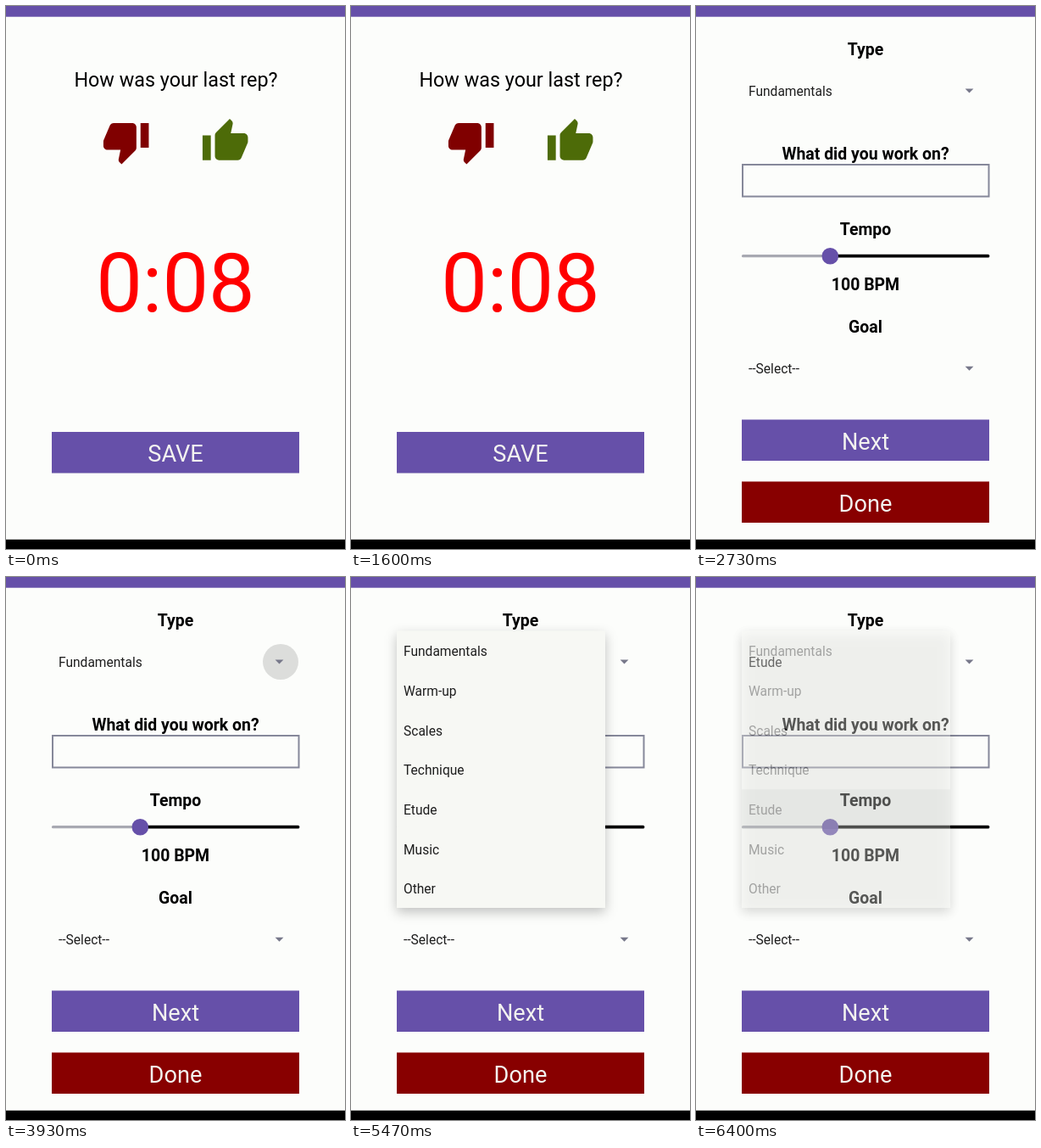
Recreate the animation shown at these times as an HTML page. Size 400 px wide and 640 px high, loop 6470 ms.

```html
<!DOCTYPE html>
<html lang="en">
<head>
<meta charset="utf-8">
<title>Practice log</title>
<style>
  html, body { margin: 0; width: 100%; height: 100%; overflow: hidden; background: #fcfdfb; }
  svg { display: block; width: 100%; height: 100%; font-family: Roboto, sans-serif; }
  .page { fill: #fcfdfb; }
  .accent { fill: #6650a9; }
  .mid { text-anchor: middle; }
  .head { font-size: 19.46px; font-weight: 700; text-anchor: middle; }
  .item { font-size: 15.57px; fill: #1e1e1e; }
  .btn { font-size: 27.2px; fill: #f3f3f0; text-anchor: middle; }
</style>
</head>
<body>
<svg viewBox="0 0 400 640">
  <defs>
    <filter id="blur" x="-20%" y="-20%" width="140%" height="140%">
      <feGaussianBlur stdDeviation="7"/>
    </filter>
    <clipPath id="reveal"><rect class="sheet"/></clipPath>
    <clipPath id="row"><rect x="54" y="250.3" width="246" height="46.7"/></clipPath>
  </defs>
  <rect class="page" width="400" height="640"/>

  <g id="form">
    <text class="head" x="200" y="58">Type</text>
    <circle id="press" cx="324" cy="100" fill="#dcdddb"/>
    <text id="type" class="item" x="62" y="106"></text>
    <path d="M317.6 97.6h9.8l-4.9 4.9z" fill="#77788a"/>
    <text class="head" x="200" y="181">What did you work on?</text>
    <rect x="55" y="187" width="290.5" height="37.5" fill="none" stroke="#86889a" stroke-width="2"/>
    <text class="head" x="200" y="270">Tempo</text>
    <path d="M55.5 294.7H158" stroke="#a8a9b2" stroke-width="3.2" stroke-linecap="round"/>
    <path d="M158 294.7H344.5" stroke="#000" stroke-width="3.8" stroke-linecap="round"/>
    <circle class="accent" cx="158.3" cy="294.7" r="9.8"/>
    <text class="head" x="200" y="335">100 BPM</text>
    <text class="head" x="200" y="385">Goal</text>
    <text class="item" x="62" y="433">--Select--</text>
    <path d="M317.6 424.8h9.8l-4.9 4.9z" fill="#77788a"/>
    <rect class="accent" x="54" y="487.5" width="292" height="48.5"/>
    <text class="btn" x="200" y="522.5">Next</text>
    <rect x="54" y="560.5" width="292" height="48.5" fill="#880000"/>
    <text class="btn" x="200" y="595.5">Done</text>
  </g>

  <rect id="glow" x="54" y="67" width="246" height="328" filter="url(#blur)"/>
  <g id="popup">
    <rect class="sheet" transform="translate(0 5)" fill-opacity=".24" filter="url(#blur)"/>
    <rect class="sheet" fill="#f7f8f4"/>
    <g clip-path="url(#reveal)">
      <g clip-path="url(#row)"><circle id="touch" cx="150" cy="273.6" fill="#dcdfdb"/></g>
      <g id="list"></g>
    </g>
  </g>

  <g id="rep">
    <rect class="page" width="400" height="640"/>
    <text class="mid" x="200.5" y="95" font-size="23.35">How was your last rep?</text>
    <path transform="translate(112.5 130.6) scale(2.433)" fill="#800000" d="M15 3H6c-.83 0-1.54.5-1.84 1.22l-3.02 7.05c-.09.23-.14.47-.14.73v2c0 1.1.9 2 2 2h6.31l-.95 4.57-.03.32c0 .41.17.79.44 1.06L9.83 23l6.59-6.59c.36-.36.58-.86.58-1.41V5c0-1.1-.9-2-2-2zm4 0v12h4V3h-4z"/>
    <path transform="translate(229.5 130.6) scale(2.433)" fill="#4d6b08" d="M1 21h4V9H1v12zm22-11c0-1.1-.9-2-2-2h-6.31l.95-4.57.03-.32c0-.41-.17-.79-.44-1.06L14.17 1 7.59 7.59C7.22 7.95 7 8.45 7 9v10c0 1.1.9 2 2 2h9c.83 0 1.54-.5 1.84-1.22l3.02-7.05c.09-.23.14-.47.14-.73v-2z"/>
    <text class="mid" x="200" y="360" font-size="97.3" fill="#f00">0:08</text>
    <rect x="54" y="502" width="292" height="48.5" fill="#dcdddb"/>
    <text class="btn" x="200" y="537" style="fill:#e3e4e2">SAVE</text>
    <g id="save">
      <rect class="accent" x="54" y="502" width="292" height="48.5"/>
      <text class="btn" x="200" y="537">SAVE</text>
    </g>
  </g>

  <rect class="accent" width="400" height="12.7"/>
  <rect y="628.8" width="400" height="11.2"/>
</svg>
<script>
  const LOOP = 6470;
  const $ = id => document.getElementById(id);
  const set = (el, attrs) => {
    for (const key in attrs) el.setAttribute(key, attrs[key]);
  };
  const ramp = (t, from, to) => Math.min(1, Math.max(0, (t - from) / (to - from)));
  const easeOut = p => 1 - (1 - p) ** 3;
  const fade = (id, opacity) => set($(id), {
    opacity, visibility: opacity > 0 ? 'visible' : 'hidden'
  });

  const kinds = ['Fundamentals', 'Warm-up', 'Scales', 'Technique', 'Etude', 'Music', 'Other'];
  kinds.forEach((kind, i) => {
    const label = document.createElementNS('http://www.w3.org/2000/svg', 'text');
    set(label, { class: 'item', x: 62, y: 93.2 + 46.7 * i });
    label.textContent = kind;
    $('list').append(label);
  });
  const sheets = document.querySelectorAll('.sheet');

  function draw(t) {
    // Saving closes the rep screen
    fade('save', 1 - ramp(t, 1780, 1950));
    fade('rep', 1 - ramp(t, 2110, 2400));

    // Spinner press
    set($('press'), { r: 21 * easeOut(ramp(t, 3580, 3850)) });
    fade('press', ramp(t, 3580, 3750) * (1 - ramp(t, 3980, 4220)));
    $('type').textContent = t < 6300 ? kinds[0] : kinds[4];

    // The list opens outward from the spinner row
    const open = easeOut(ramp(t, 3960, 4230));
    const close = ramp(t, 6300, 6455);
    const top = 100 - 36.7 * open;
    const bottom = 100 + 290 * open;
    sheets.forEach(sheet => set(sheet, {
      x: 177 - 123 * open, y: top, width: 246 * open, height: bottom - top
    }));
    const settle = easeOut(ramp(t, 3960, 4250));
    set($('list'), { transform: `translate(0 ${-126 * (1 - settle)})` });
    fade('popup', ramp(t, 3960, 4070) * (1 - close));

    // The shadow shows through the fading list
    fade('glow', close * (1 - close) * 0.3);

    // Choosing a row
    set($('touch'), { r: 155 * easeOut(ramp(t, 6050, 6320)) });
    fade('touch', ramp(t, 6050, 6150) * 0.9);
  }

  const start = performance.now();
  function tick() {
    draw((performance.now() - start) % LOOP);
    requestAnimationFrame(tick);
  }
  draw(0);
  requestAnimationFrame(tick);
</script>
</body>
</html>
```
